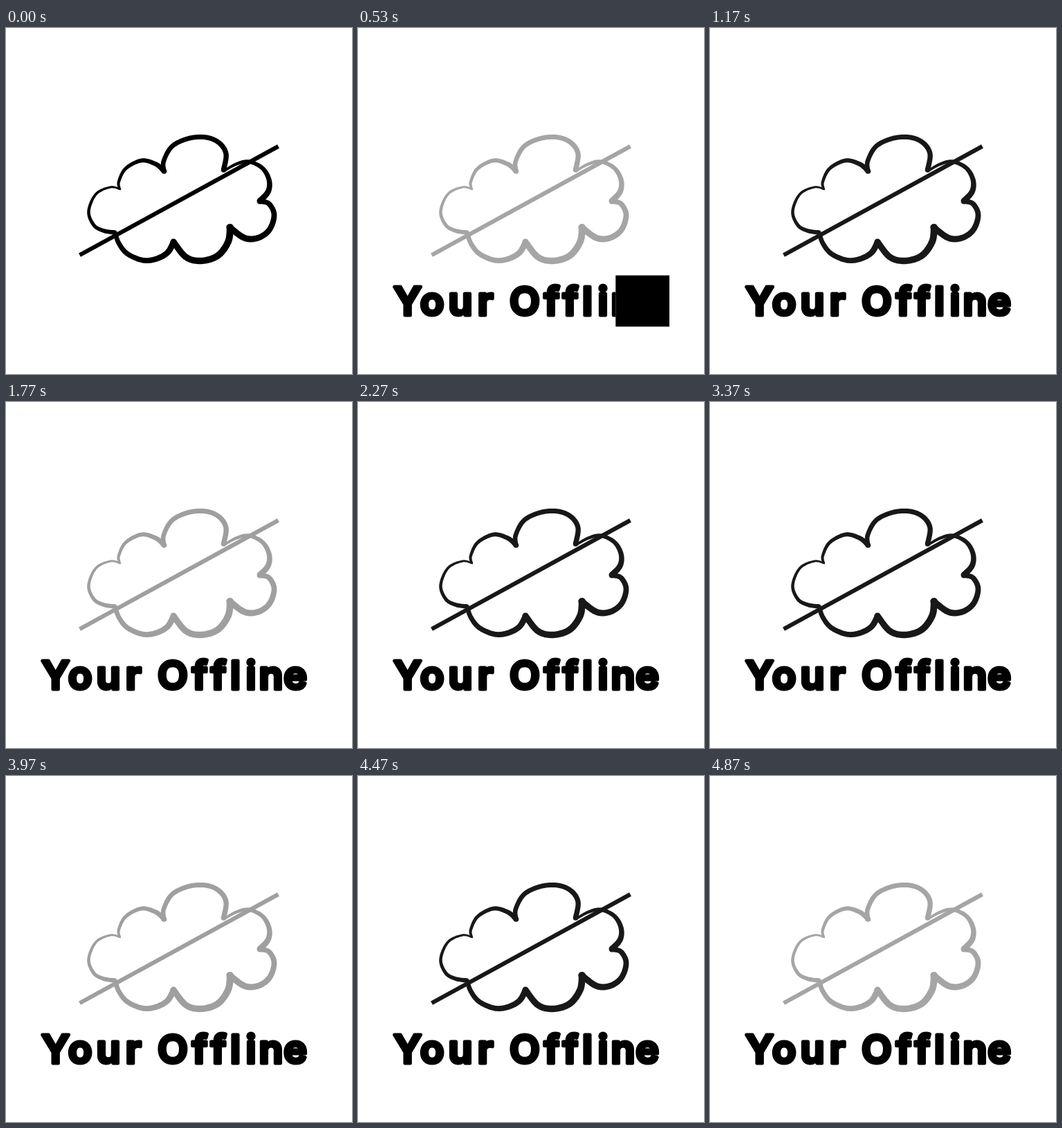
Animation, 500 px wide and 500 px high, one loop 5.01 s. Source, as an HTML page:

```html
<!DOCTYPE html>
<html lang="en">
<head>
<meta charset="utf-8">
<title>Offline</title>
<style>
  html, body { margin: 0; width: 100%; height: 100%; overflow: hidden; background: #fff; }
  svg { display: block; width: 100%; height: 100%; }
  text {
    font: 600 57px Inter, "Open Sans", sans-serif;
    text-anchor: middle;
    stroke: #000;
    stroke-width: 5;
    stroke-linejoin: round;
  }
</style>
</head>
<body>
<svg viewBox="0 0 500 500">
  <defs>
    <clipPath id="reveal"><rect id="shown" x="40" y="350" width="0" height="90"/></clipPath>
  </defs>
  <g id="cloud">
    <path d="M106.5 328.2L393.5 171" stroke="#000" stroke-width="6"/>
  </g>
  <g clip-path="url(#reveal)">
    <text y="414.5" x="71.5 107 148 184 205 241 280 307 331.5 354 383 418">Your Offline</text>
  </g>
  <rect id="block" y="357.5" height="74"/>
</svg>
<script>
const LOOP = 5010, PULSE = 1100, FADE = 450, DIM = 0.35;
const WIPE = 312, LEFT = 50, RIGHT = 450;

const $ = id => document.getElementById(id);
const cloud = $('cloud'), shown = $('shown'), block = $('block');

// Each lobe: start width, end width, points along its middle.
const lobes = [
  [2.5, 6.5, [165,233, 151,230, 130,240, 119.5,265, 127,285, 141,293, 157,295.5]],
  [3.5, 7.5, [164,232, 163,222, 173,203, 196,191.5, 217,197, 228.5,207]],
  [6.5, 7.5, [228,205, 228,192, 240,171, 264,159.5, 289,158, 308,166, 318,182, 314.5,205]],
  [3.5, 9, [316,206, 332,197, 350,193, 370,202, 380,219, 379,236, 367,250]],
  [7, 9.5, [367,250.5, 380,254, 387.5,270, 381,291, 365,303, 345,303.5, 323,288]],
  [10, 9, [324,288, 321,309, 306,329, 282,336.5, 260,331, 242,309]],
  [9, 6.5, [242,310, 233,325, 216,334, 197,335.5, 175,326, 163,311, 158,297]]
];

function add(name, attrs) {
  const el = document.createElementNS('http://www.w3.org/2000/svg', name);
  for (const key in attrs) el.setAttribute(key, attrs[key]);
  cloud.appendChild(el);
}

// Catmull-Rom curve through the points, sampled evenly.
function sample(flat, steps = 12) {
  const pts = [];
  for (let i = 0; i < flat.length; i += 2) pts.push([flat[i], flat[i + 1]]);
  const last = pts.length - 1, out = [];
  for (let i = 0; i < last; i++) {
    const a = pts[Math.max(i - 1, 0)], b = pts[i];
    const c = pts[i + 1], d = pts[Math.min(i + 2, last)];
    for (let s = 0; s < steps; s++) {
      const u = s / steps;
      out.push([0, 1].map(k => b[k] + 0.5 * u * (c[k] - a[k]
        + u * (2 * a[k] - 5 * b[k] + 4 * c[k] - d[k]
        + u * (3 * (b[k] - c[k]) + d[k] - a[k])))));
    }
  }
  out.push(pts[last]);
  return out;
}

// A stroke whose width changes along its length, with round ends.
function brush([w0, w1, flat]) {
  const pts = sample(flat), last = pts.length - 1;
  const one = [], two = [];
  pts.forEach(([x, y], i) => {
    const p = pts[Math.max(i - 1, 0)], q = pts[Math.min(i + 1, last)];
    const dx = q[0] - p[0], dy = q[1] - p[1];
    const k = (w0 + (w1 - w0) * i / last) / 2 / Math.hypot(dx, dy);
    one.push([x - dy * k, y + dx * k]);
    two.unshift([x + dy * k, y - dx * k]);
  });
  add('polygon', { points: one.concat(two).join(' ') });
  add('circle', { cx: pts[0][0], cy: pts[0][1], r: w0 / 2 });
  add('circle', { cx: pts[last][0], cy: pts[last][1], r: w1 / 2 });
}

const clamp = v => Math.min(1, Math.max(0, v));
const ease = v => (1 - Math.cos(Math.PI * clamp(v))) / 2;

function draw(ms) {
  // 30 pictures a second
  const t = Math.floor((ms % LOOP + 5) * 0.03) / 0.03;

  const p = t % PULSE;
  const fade = clamp(Math.min(p, PULSE - p) / FADE);
  cloud.setAttribute('opacity', 1 - (1 - DIM) * fade);

  const span = RIGHT - LEFT;
  const head = LEFT + span * ease(t / WIPE);
  const tail = LEFT + span * ease(t / WIPE - 1);
  block.setAttribute('x', tail);
  block.setAttribute('width', Math.max(0, head - tail));
  shown.setAttribute('width', tail > LEFT ? tail - 40 : 0);
}

lobes.forEach(brush);
const start = performance.now();
function tick() {
  draw(performance.now() - start);
  requestAnimationFrame(tick);
}
tick();
</script>
</body>
</html>
```
